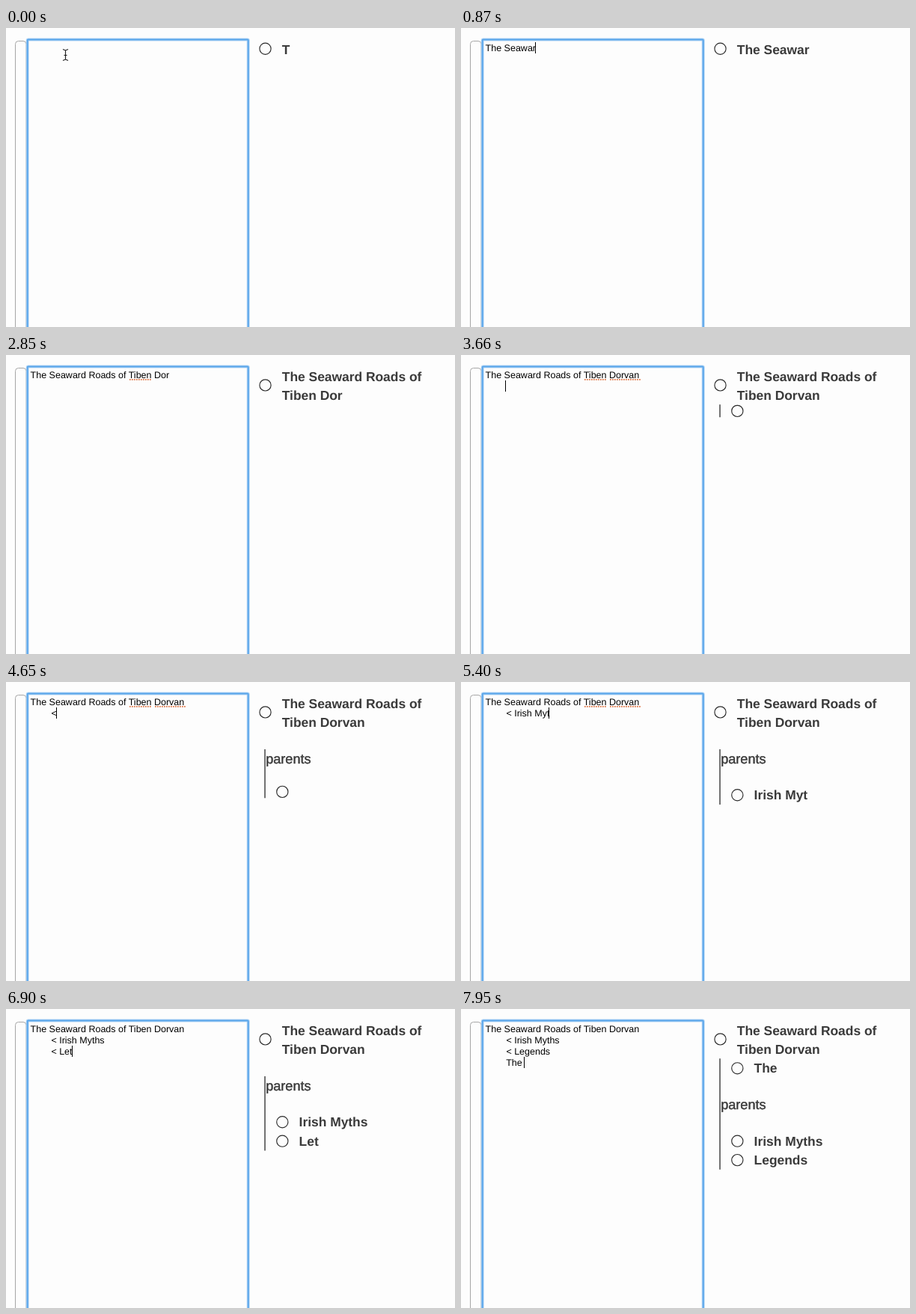
Animation, 600 px wide and 400 px high, one loop 8000 ms. Source, as an HTML page with a canvas:

```html
<!DOCTYPE html>
<html lang="en">
<head>
<meta charset="utf-8">
<title>Outline editor</title>
<style>
  html, body { margin: 0; width: 100%; height: 100%; overflow: hidden; background: #fdfdfd; }
  canvas { display: block; width: 600px; height: 400px; }
</style>
</head>
<body>
<canvas id="stage"></canvas>
<script>
const LOOP = 8000;
const FAMILY = '"Liberation Sans", Arial, sans-serif';
const EDIT_FONT = '12.5px ' + FAMILY;
const HEAD_FONT = 'bold 17.4px ' + FAMILY;
const LABEL_FONT = '18.1px ' + FAMILY;
const INK = '#3a3a3a';
const ROW = 25.4, EMPTY_ROW = 16.6, EDIT_ROW = 15.2;

// Keystrokes: first key time, last key time, keys ('\b' deletes)
const KEYS = [
  [0, 0, 'T'], [240, 330, 'he'], [480, 1230, ' Seaward Roads'],
  [1350, 1620, ' of Ti'], [1680, 1800, 'ben'], [1950, 1950, ' '],
  [2400, 2640, 'Dor'], [2970, 3090, 'van'],
  [3240, 3240, '\n'], [3420, 3420, '\t'], [3810, 3810, '<'],
  [4740, 4740, ' I'], [4890, 5400, 'rish Myt'], [5490, 5490, 'h'], [5640, 5640, 's'],
  [5646, 5646, '\n'], [5790, 5790, '\t'], [5940, 5940, '<'],
  [6240, 6660, ' Lette'], [6840, 6960, '\b\b\b'], [7020, 7200, 'gend'], [7350, 7350, 's'],
  [7410, 7410, '\n'], [7470, 7470, '\t'], [7620, 7620, 'Th'], [7740, 7740, 'e'], [7950, 7950, ' ']
];
// The preview keeps its old state during these spans
const HOLDS = [[3230, 3600], [3800, 4080], [5642, 6090], [7400, 7890]];
const CARET_OFF = [[0, 90], [2250, 2400], [2850, 2970], [4380, 4500]];
// Spell check marks: word, shown from, shown until
const MARKS = [['Tiben', 2040, 5790], ['Dorvan', 3360, 5790]];

const canvas = document.getElementById('stage');
const ctx = canvas.getContext('2d');
const ratio = window.devicePixelRatio || 1;
canvas.width = 600 * ratio;
canvas.height = 400 * ratio;

const within = (t, [a, b]) => t >= a && t < b;

function typed(t) {
  let text = '';
  for (const [start, end, keys] of KEYS) {
    for (let i = 0; i < keys.length; i++) {
      const at = start + (end - start) * i / Math.max(1, keys.length - 1);
      if (at > t) return text;
      text = keys[i] === '\b' ? text.slice(0, -1) : text + keys[i];
    }
  }
  return text;
}

function width(text, font) {
  ctx.font = font;
  return ctx.measureText(text).width;
}

function write(text, x, y, font, color) {
  ctx.font = font;
  ctx.fillStyle = color;
  ctx.fillText(text, x, y);
}

function line(x1, y1, x2, y2, color, w = 1) {
  ctx.strokeStyle = color;
  ctx.lineWidth = w;
  ctx.beginPath();
  ctx.moveTo(x1, y1);
  ctx.lineTo(x2, y2);
  ctx.stroke();
}

function ring(x, y) {
  ctx.strokeStyle = '#2a2a2a';
  ctx.lineWidth = 1.15;
  ctx.beginPath();
  ctx.arc(x, y, 7.6, 0, 7);
  ctx.stroke();
}

function wrap(text, limit) {
  const rows = [''];
  for (const word of text.split(' ')) {
    const last = rows[rows.length - 1];
    const next = last ? last + ' ' + word : word;
    if (last && width(next, HEAD_FONT) > limit) rows.push(word);
    else rows[rows.length - 1] = next;
  }
  return rows;
}

function drawFrame() {
  ctx.fillStyle = '#fdfdfd';
  ctx.fillRect(0, 0, 600, 400);
  ctx.strokeStyle = '#a6a6a6';
  ctx.lineWidth = 1;
  ctx.beginPath();
  ctx.roundRect(12.5, 17.5, 14.5, 420, 4);
  ctx.stroke();
  for (const [color, w] of [['#b4d6f6', 4], ['#5aa6ea', 2]]) {
    ctx.strokeStyle = color;
    ctx.lineWidth = w;
    ctx.beginPath();
    ctx.roundRect(28.7, 15.5, 295, 420, 1);
    ctx.stroke();
  }
}

function drawEditor(t) {
  const rows = (t < 90 ? '' : typed(t)).split('\n').map(s => s.replace('\t', ' '.repeat(8)));
  const left = 32.6, base = 30.8;
  rows.forEach((row, i) => write(row, left, base + i * EDIT_ROW, EDIT_FONT, '#000'));

  for (const [word, from, until] of MARKS) {
    const at = rows[0].indexOf(word);
    if (at < 0 || !within(t, [from, until])) continue;
    const x = left + width(rows[0].slice(0, at), EDIT_FONT);
    const end = x + width(word, EDIT_FONT);
    ctx.fillStyle = '#e07a4c';
    for (let dot = x + 1; dot < end; dot += 3) ctx.fillRect(dot, 32, 1.8, 1.8);
  }

  if (!CARET_OFF.some(span => within(t, span))) {
    const n = rows.length - 1;
    const x = Math.round(left + width(rows[n], EDIT_FONT)) - 1;
    const y = Math.round(base + n * EDIT_ROW);
    ctx.fillStyle = '#000';
    ctx.fillRect(x, y - 12, 1, 15);
  }
}

function drawItem(text, top) {
  const h = text ? ROW : EMPTY_ROW;
  ring(369.3, top + h / 2);
  write(text, 391.6, top + 18.7, HEAD_FONT, INK);
  return top + h;
}

function drawPreview(t) {
  const hold = HOLDS.find(span => within(t, span));
  const [title, ...rest] = typed(hold ? hold[0] : t).split('\n');
  const heads = wrap(title.trim(), 212);
  let y = 15.8;
  ring(346.5, y - 0.8 + heads.length * ROW / 2);
  for (const row of heads) {
    write(row, 368.8, y + 18.7, HEAD_FONT, INK);
    y += ROW;
  }
  if (!rest.length) return;

  const items = rest.map(s => s.trim());
  const children = items.filter(s => s[0] !== '<');
  const parents = items.filter(s => s[0] === '<').map(s => s.slice(1).trim());
  const top = children.length ? y - 0.4 : y + 23.4;
  for (const child of children) y = drawItem(child, y);
  if (parents.length) {
    write('parents', 347.2, y + 42.4, LABEL_FONT, INK);
    ctx.strokeStyle = INK;
    ctx.lineWidth = 0.45;
    ctx.strokeText('parents', 347.2, y + 42.4);
    y += 72;
    for (const parent of parents) y = drawItem(parent, y);
  }
  line(346, top, 346, y, '#444', 1.5);
}

function drawPointer() {
  for (const [color, w] of [['#fff', 3], ['#222', 1.2]]) {
    line(79.5, 30, 79.5, 42, color, w);
    line(77.5, 36.5, 81.5, 36.5, color, w);
    for (const [y, bend] of [[28.5, 1.5], [43.5, -1.5]]) {
      line(76, y, 79.5, y + bend, color, w);
      line(83, y, 79.5, y + bend, color, w);
    }
  }
}

function draw(t) {
  ctx.setTransform(ratio, 0, 0, ratio, 0, 0);
  ctx.textRendering = 'geometricPrecision';
  drawFrame();
  drawEditor(t);
  drawPreview(t);
  if (t < 240) drawPointer();
}

const start = performance.now();
function tick() {
  draw((performance.now() - start + 1) % LOOP);
  requestAnimationFrame(tick);
}
tick();
</script>
</body>
</html>
```
